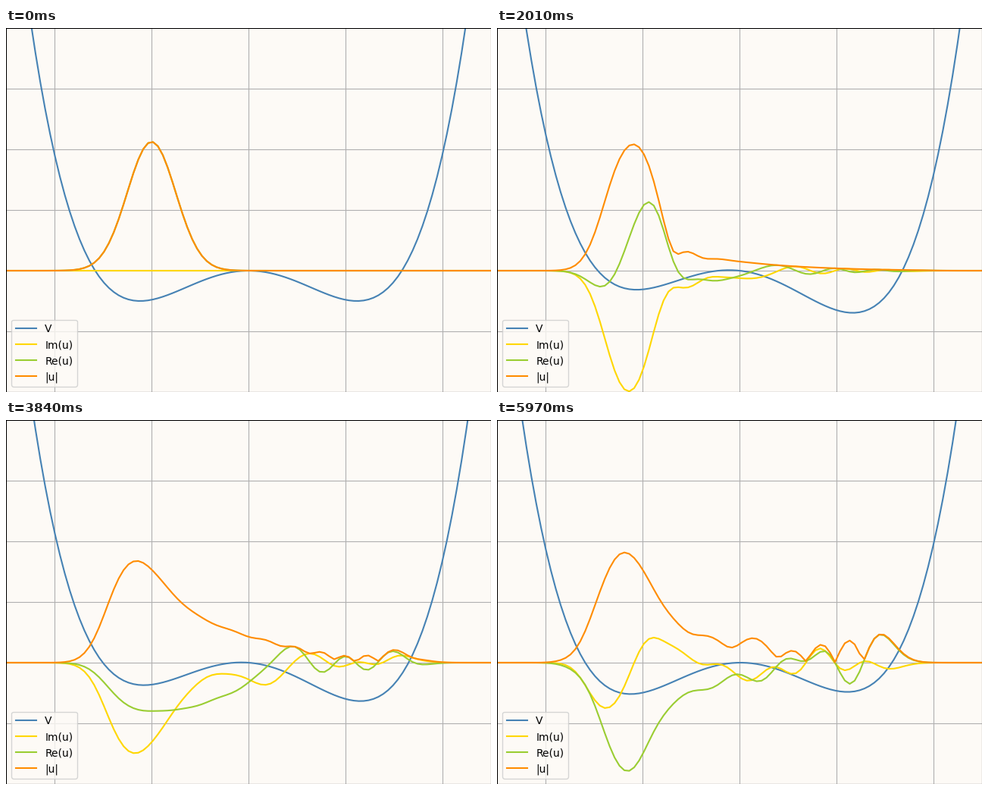
These frames come from a looping animation (640 by 480 pixels, 6000 ms). A matplotlib script:

```python
import numpy as np
import matplotlib.pyplot as plt
from matplotlib.animation import FuncAnimation

FRAMES = 200
HBAR = 0.15
G = 0.1             # self-interaction strength
DT = np.pi / 40     # model time per frame
SUBSTEPS = 10
N = 100
PAPER = "#fdfaf6"

x = np.linspace(-5, 5, N)
dx = x[1] - x[0]


def potential(t):
    """Double well, rocked sideways by a periodic force."""
    return 0.01 * x**4 - 0.1 * x**2 + 0.05 * x * np.sin(t)


def kinetic_step(h):
    """Exact propagator of the kinetic term over a time h."""
    lap = (np.eye(N, k=1) - 2 * np.eye(N) + np.eye(N, k=-1)) / dx**2
    energy, modes = np.linalg.eigh(-0.5 * HBAR**2 * lap)
    return (modes * np.exp(-1j * h * energy / HBAR)) @ modes.T


def evolve():
    """Split-step solution of the nonlinear Schroedinger equation."""
    h = DT / SUBSTEPS
    drift = kinetic_step(h)

    def kick(u, t):
        return u * np.exp(-0.5j * h / HBAR * (potential(t) + G * abs(u)**2))

    s = 0.5
    u = (np.pi * s**2) ** -0.25 * np.exp(-((x + 2) ** 2) / (2 * s**2)) + 0j
    waves = [u]
    for n in range(FRAMES - 1):
        for k in range(SUBSTEPS):
            t = n * DT + k * h
            u = kick(drift @ kick(u, t), t + h)
        waves.append(u)
    return waves


waves = evolve()

fig = plt.figure(figsize=(6.4, 4.8), dpi=100)
ax = fig.add_axes([0, 0, 1, 1], facecolor=PAPER)
ax.set_xlim(-5, 5)
ax.set_ylim(-1, 2)
ax.set_xticks(np.arange(-4, 5, 2))
ax.set_yticks(np.arange(-1, 2.1, 0.5))
ax.grid(True)

styles = [("V", "steelblue"), ("Im(u)", "gold"),
          ("Re(u)", "yellowgreen"), ("|u|", "darkorange")]
lines = [ax.plot(x, 0 * x, color=c, label=name)[0] for name, c in styles]
ax.legend(loc="lower left", facecolor=PAPER)


def update(n):
    u = waves[n]
    for line, y in zip(lines, (potential(n * DT), u.imag, u.real, abs(u))):
        line.set_ydata(y)
    return lines


anim = FuncAnimation(fig, update, frames=FRAMES, interval=30,
                     init_func=lambda: update(0), repeat=True, repeat_delay=0)
plt.show()
```
